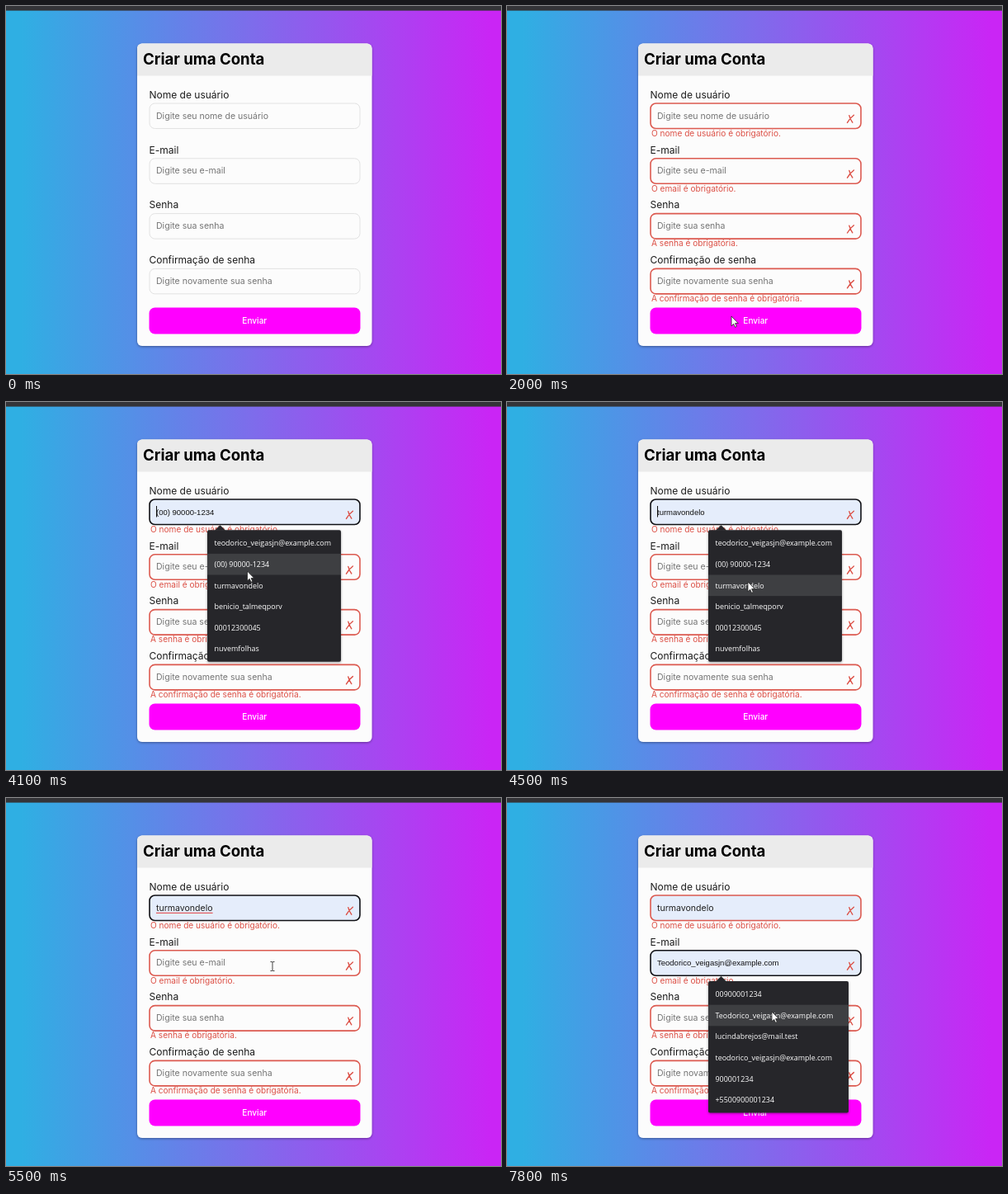
Recreate the animation shown at these times as an HTML page. Size 600x446 px, loop 8000 ms.

```html
<!DOCTYPE html>
<html lang="pt-BR">
<head>
<meta charset="utf-8">
<title>Criar uma Conta</title>
<style>
  html, body { margin: 0; width: 100%; height: 100%; overflow: hidden; }
  svg { display: block; width: 600px; height: 446px; }
  text { font-family: Inter, sans-serif; white-space: pre; }
  .title { font-size: 18.6px; font-weight: 700; }
  .label { font-size: 12px; fill: #1b1b1b; }
  .hint { font-size: 10.55px; fill: #757575; }
  .value { font-size: 10.55px; fill: #222; }
  .preview { font: 9.5px "Liberation Sans", Arial, sans-serif; fill: #111; }
  .error { font-size: 10.1px; fill: #dc4f45; }
  .send { font-size: 10.1px; font-weight: 500; fill: #fff; text-anchor: middle; }
  .item { font: 8.95px "Open Sans", sans-serif; fill: #fff; }
  .cross { fill: none; stroke: #dc4f45; stroke-width: 1.4; stroke-linecap: round; }
</style>
</head>
<body>
<svg id="stage" viewBox="0 0 600 446">
  <defs>
    <linearGradient id="sky">
      <stop offset="0.03" stop-color="#2fafe3"/>
      <stop offset="0.5" stop-color="#7e6ceb"/>
      <stop offset="0.98" stop-color="#ca25f5"/>
    </linearGradient>
    <filter id="soft" x="-10%" y="-10%" width="120%" height="120%">
      <feDropShadow dx="0" dy="1" stdDeviation="1.4" flood-opacity="0.38"/>
    </filter>
  </defs>
  <rect width="600" height="446" fill="url(#sky)"/>
  <rect width="600" height="5.6" fill="#343438"/>
  <rect x="159" y="45.4" width="284.5" height="366.6" rx="6" fill="#fcfcfc" filter="url(#soft)"/>
  <path d="M159 84.5V51.4a6 6 0 0 1 6-6H437.5a6 6 0 0 1 6 6V84.5Z" fill="#ebebeb"/>
  <text class="title" x="166" y="71.2">Criar uma Conta</text>
  <g id="fields"></g>
  <rect x="173.5" y="365.5" width="256" height="32" rx="7" fill="#f0f"/>
  <text class="send" x="301.3" y="384.9">Enviar</text>
  <g id="menus"></g>
  <path id="arrow" d="M0 0V11.8L2.7 9.3L4.5 13.3L6.4 12.4L4.6 8.6H8.3Z"
        fill="#fff" stroke="#222" stroke-width="0.8" stroke-linejoin="round"/>
  <path id="beam" d="M-2.5 -5.5H-.8L0 -5L.8 -5.5H2.5M0 -5V5M-2.5 5.5H-.8L0 5L.8 5.5H2.5"
        fill="none" stroke="#444" stroke-width="1"/>
</svg>
<script>
const LOOP = 8000, STEP = 100, PITCH = 66.8, ROW = 25.6;
const ERRORS_AT = 1500, NAME_AT = 3400, PICK_AT = 4800, MAIL_AT = 5800;

const fieldData = [
  ['Nome de usuário', 'Digite seu nome de usuário', 'O nome de usuário é obrigatório.'],
  ['E-mail', 'Digite seu e-mail', 'O email é obrigatório.'],
  ['Senha', 'Digite sua senha', 'A senha é obrigatória.'],
  ['Confirmação de senha', 'Digite novamente sua senha', 'A confirmação de senha é obrigatória.']
];
const menuData = [
  { y: 155.3, w: 162, items: ['teodorico_veigasjn@example.com', '(00) 90000-1234',
    'turmavondelo', 'benicio_talmeqporv', '00012300045', 'nuvemfolhas'] },
  { y: 222.1, w: 170, items: ['00900001234', 'Teodorico_veigasjn@example.com',
    'lucindabrejos@mail.test', 'teodorico_veigasjn@example.com', '900001234', '+5500900001234'] }
];
// Pointer path: time, x, y
const path = [
  [100, 284, 8], [300, 264, 70], [500, 250, 190], [700, 258, 312], [900, 272, 376],
  [2400, 272, 376], [2700, 284, 250], [3000, 288, 132],
  [3400, 288, 132], [3800, 291, 178], [4200, 293, 214], [4500, 292, 218],
  [4700, 292, 218], [5500, 323, 204],
  [6300, 323, 204], [6400, 316, 221], [7200, 319, 256], [7300, 320, 257],
  [7400, 320, 257], [7600, 322, 272], [7800, 321, 259]
];

const $ = id => document.getElementById(id);
const show = (el, on) => { el.style.display = on ? '' : 'none'; };

function add(parent, tag, attrs = {}, text = '') {
  const el = document.createElementNS('http://www.w3.org/2000/svg', tag);
  for (const key in attrs) el.setAttribute(key, attrs[key]);
  el.textContent = text;
  parent.appendChild(el);
  return el;
}
const write = (parent, kind, x, y, text) => add(parent, 'text', { class: kind, x, y }, text);

const fields = fieldData.map(([label, hint, error], i) => {
  const g = add($('fields'), 'g', { transform: `translate(173 ${117 + PITCH * i})` });
  write(g, 'label', 0.5, -5.3, label);
  const box = add(g, 'rect', { x: 1, y: 1, width: 255, height: 30.5, rx: 6.5 });
  const hintText = write(g, 'hint', 9, 19.7, hint);
  const value = write(g, 'value', 9, 19.7, '');
  const caret = add(g, 'path', { d: 'M9.5 9V22.5', stroke: '#111', 'stroke-width': 1 });
  const wave = add(g, 'path', { fill: 'none', stroke: '#e03a3a', 'stroke-width': 1 });
  const bad = add(g, 'g');
  add(bad, 'path', { class: 'cross', d: 'M239.5 24.4Q242.8 18.6 247.4 15.2M241.8 15.6Q243 20.4 245.8 24.2' });
  write(bad, 'error', 2, 40.8, error);
  return { box, hintText, value, caret, wave, bad };
});

const menus = menuData.map(({ y, w, items }) => {
  const g = add($('menus'), 'g', { transform: `translate(244 ${y})` });
  const body = add(g, 'g', { fill: '#27282b', filter: 'url(#soft)' });
  add(body, 'rect', { width: w, height: 159.5, rx: 2 });
  add(body, 'path', { d: 'M9 .5L15.5 -6L22 .5Z' });
  const mark = add(g, 'rect', { width: w, height: ROW, fill: '#3e3f42' });
  items.forEach((item, i) => write(g, 'item', 8.5, 19.1 + ROW * i, item));
  return { g, mark };
});

function pointer(t) {
  const i = path.findIndex(p => p[0] > t);
  if (i < 0) return path[path.length - 1].slice(1);
  const a = path[Math.max(i - 1, 0)], b = path[i];
  const k = i ? (t - a[0]) / (b[0] - a[0]) : 0;
  return [a[1] + (b[1] - a[1]) * k, a[2] + (b[2] - a[2]) * k];
}

function rowAt(menu, y) {
  const row = Math.floor((y - menuData[menu].y - 3) / ROW);
  return row >= 0 && row < 6 ? row : -1;
}

function setField(i, text, focused, preview, failed) {
  const f = fields[i];
  f.box.setAttribute('fill', text ? '#e5edfb' : '#fcfcfc');
  f.box.setAttribute('stroke', focused ? '#101014' : failed ? '#dc5a50' : '#e2e2e2');
  f.box.setAttribute('stroke-width', focused || failed ? 1.6 : 1);
  f.value.textContent = text;
  f.value.setAttribute('class', preview ? 'preview' : 'value');
  show(f.hintText, !text);
  show(f.bad, failed);
}

function draw(t) {
  const [x, y] = pointer(t);
  const open = t >= MAIL_AT ? 1 : t >= NAME_AT && t < PICK_AT ? 0 : -1;
  const row = open < 0 ? -1 : rowAt(open, y);
  const focus = t >= MAIL_AT ? 1 : t >= NAME_AT ? 0 : -1;
  const picked = t >= PICK_AT;

  fields.forEach((f, i) => {
    const preview = i === open && row >= 0;
    const text = preview ? menuData[i].items[row] : i === 0 && picked ? menuData[0].items[2] : '';
    setField(i, text, i === focus, preview, t >= ERRORS_AT);
    show(f.caret, i === 0 && open === 0);
    const spell = i === 0 && picked && focus === 0;
    show(f.wave, spell);
    if (spell) f.wave.setAttribute('d', `M9 22.3h${f.value.getComputedTextLength()}`);
  });

  menus.forEach(({ g, mark }, i) => {
    show(g, i === open);
    show(mark, row >= 0);
    mark.setAttribute('y', 3 + ROW * row);
  });

  const fy = (y - 117) % PITCH;
  const overField = x > 173 && x < 429 && y > 117 && y < 350 && fy < 32;
  const overMenu = open >= 0 && y > menuData[open].y - 6;
  const beam = overField && !overMenu;
  show($('beam'), t >= 100 && beam);
  show($('arrow'), t >= 100 && !beam);
  for (const id of ['arrow', 'beam']) $(id).setAttribute('transform', `translate(${x} ${y})`);
}

const start = performance.now();
function tick() {
  const t = (performance.now() - start) % LOOP;
  draw(Math.floor(t / STEP) * STEP);
  requestAnimationFrame(tick);
}
tick();
</script>
</body>
</html>
```
